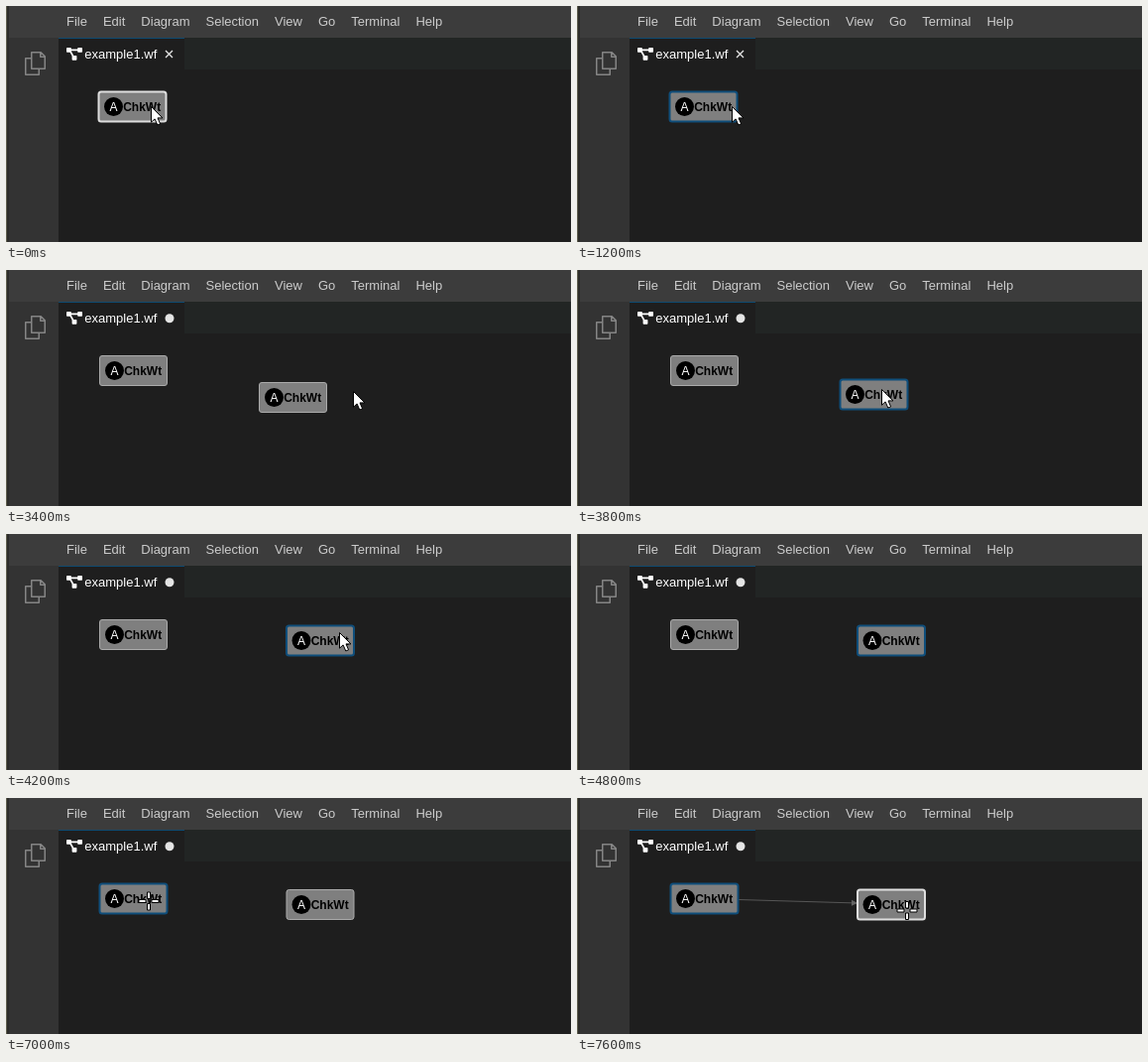
These frames come from a looping animation (570 by 238 pixels, 8000 ms). An HTML page:

```html
<!DOCTYPE html>
<html lang="en">
<head>
<meta charset="utf-8">
<title>Workflow diagram editor</title>
<style>
  html, body { margin: 0; width: 100%; height: 100%; overflow: hidden; background: #1e1e1e; }
  svg { display: block; width: 570px; height: 238px; }
  text { font-family: "Liberation Sans", Arial, sans-serif; font-size: 13px; }
  .node rect { fill: #7f7f7f; stroke: #ababab; stroke-width: 1; }
  .node.hover rect { stroke: #dedede; stroke-width: 2; }
  .node.selected rect { stroke: #0f4e7b; stroke-width: 2; }
  .node text { font-size: 12px; }
</style>
</head>
<body>
<svg viewBox="0 0 570 238">
  <rect width="570" height="238" fill="#1e1e1e"/>
  <rect width="570" height="32" fill="#3c3c3c"/>
  <rect x="180" y="32" width="390" height="32" fill="#222524"/>
  <rect y="32" width="53" height="206" fill="#333"/>
  <rect width="3" height="238" fill="#2d2d2a"/>
  <rect width="1" height="238" fill="#5e5d4c"/>
  <rect x="53" y="32" width="127" height="1" fill="#0e4a70"/>
  <text id="menu" x="61" y="20" fill="#ccc"></text>

  <path d="M25.75 46.75H35.2L39.25 50.8V63.25H25.75ZM34.75 46.75V51.25H39.25M25.75 52.75H19.75V69.25H33.25V63.25"
        fill="none" stroke="#858585" stroke-width="1.5" stroke-linejoin="round"/>

  <g fill="#fff">
    <path d="M64 44.4H74M64.5 45L68.5 52" stroke="#fff" stroke-width="1.6"/>
    <rect x="61" y="42" width="4.8" height="4.8" rx=".8"/>
    <rect x="72.2" y="42" width="4.8" height="4.8" rx=".8"/>
    <rect x="66.6" y="50" width="4.8" height="4.8" rx=".8"/>
    <text x="79.3" y="53">example1.wf</text>
  </g>
  <path id="close" d="M161 45L168 52M168 45L161 52" stroke="#e4e4e4" stroke-width="1.3"/>
  <circle id="dirty" cx="165" cy="48.7" r="4.5" fill="#e4e4e4"/>

  <g id="edge" fill="#646464">
    <path id="line" stroke="#565656" fill="none"/>
    <path id="head" d="M0 0L-6 -3V3Z"/>
  </g>
  <g id="first"></g>
  <g id="second"></g>

  <path id="arrow" d="M.5 .5V16.2L4.1 12.9L6.8 19L9.6 17.8L7 11.9H12Z"
        fill="#fff" stroke="#000" stroke-width="1"/>
  <path id="cross" d="M-10 -1.5H-3V1.5H-10ZM3 -1.5H10V1.5H3ZM-1.5 -9H1.5V-2.5H-1.5ZM-1.5 2.5H1.5V9H-1.5Z"
        fill="#fff" stroke="#000" stroke-width="1"/>
</svg>
<script>
const LOOP = 8000;
const el = id => document.getElementById(id);
const show = (id, on) => el(id).setAttribute('display', on ? 'inline' : 'none');
const move = (id, [x, y], extra = '') => el(id).setAttribute('transform', `translate(${x} ${y})${extra}`);

el('menu').innerHTML = ['File', 'Edit', 'Diagram', 'Selection', 'View', 'Go', 'Terminal', 'Help']
  .map((label, i) => `<tspan dx="${i ? 16 : 0}">${label}</tspan>`).join('');

for (const id of ['first', 'second']) {
  el(id).innerHTML = `
    <rect x=".5" y=".5" width="68" height="30" rx="2.5"/>
    <circle cx="15.5" cy="15.5" r="9.5"/>
    <text x="15.5" y="20" fill="#fff" text-anchor="middle">A</text>
    <text x="25.2" y="20" font-weight="bold">ChkWt</text>`;
}

// Each step changes only the listed properties and holds until the next one.
const steps = [
  { at: 0, pointer: 'arrow', pos: [146, 101], firstAt: [93, 86], first: 'hover',
    secondAt: null, second: '', dirty: false, edgeTo: null },
  { at: 400, first: 'selected' },
  { at: 1200, pos: [156, 101] },
  { at: 1400, pos: [245, 109], firstAt: [94, 86], first: '' },
  { at: 1800, pos: [255, 113], secondAt: [255, 113], dirty: true },
  { at: 2000, pos: [266, 115] },
  { at: 2200, pos: [289, 119] },
  { at: 2400, pos: [321, 128] },
  { at: 2600, pos: [350, 139] },
  { at: 2800, pos: [362, 125] },
  { at: 3200, pos: [421, 118] },
  { at: 3400, pos: [350, 122] },
  { at: 3600, pos: [297, 123], second: 'selected' },
  { at: 3800, pos: [307, 120], secondAt: [265, 110] },
  { at: 4000, pos: [325, 103], secondAt: [282.5, 92] },
  { at: 4200, pos: [336, 99] },
  { at: 4400, pos: [340, 101] },
  { at: 4600, pos: [341, 102] },
  { at: 4800, pointer: null },
  { at: 6400, pointer: 'arrow', pos: [202, 161] },
  { at: 6600, pos: [166, 127] },
  { at: 6800, pos: [144, 104], first: 'hover' },
  { at: 7000, pointer: 'cross', first: 'selected', second: '' },
  { at: 7200, pos: [240, 108], edgeTo: [240, 108] },
  { at: 7400, pos: [329, 112.5], second: 'hover', edgeTo: [283, 106] },
  { at: 7600, pos: [333, 113.5] }
];

function drawEdge(to) {
  show('edge', to);
  if (!to) return;
  const [x, y] = [163, 102.5];
  const angle = Math.atan2(to[1] - y, to[0] - x) * 180 / Math.PI;
  el('line').setAttribute('d', `M${x} ${y}L${to}`);
  move('head', to, ` rotate(${angle})`);
}

function drawNode(id, pos, state) {
  show(id, pos);
  el(id).setAttribute('class', `node ${state}`);
  if (pos) move(id, pos);
}

function render(time) {
  const s = Object.assign({}, ...steps.filter(step => step.at <= time));
  drawNode('first', s.firstAt, s.first);
  drawNode('second', s.secondAt, s.second);
  drawEdge(s.edgeTo);
  show('close', !s.dirty);
  show('dirty', s.dirty);
  for (const id of ['arrow', 'cross']) {
    show(id, s.pointer === id);
    move(id, s.pos);
  }
}

const start = performance.now();
function tick() {
  render((performance.now() - start) % LOOP);
  requestAnimationFrame(tick);
}
tick();
</script>
</body>
</html>
```
